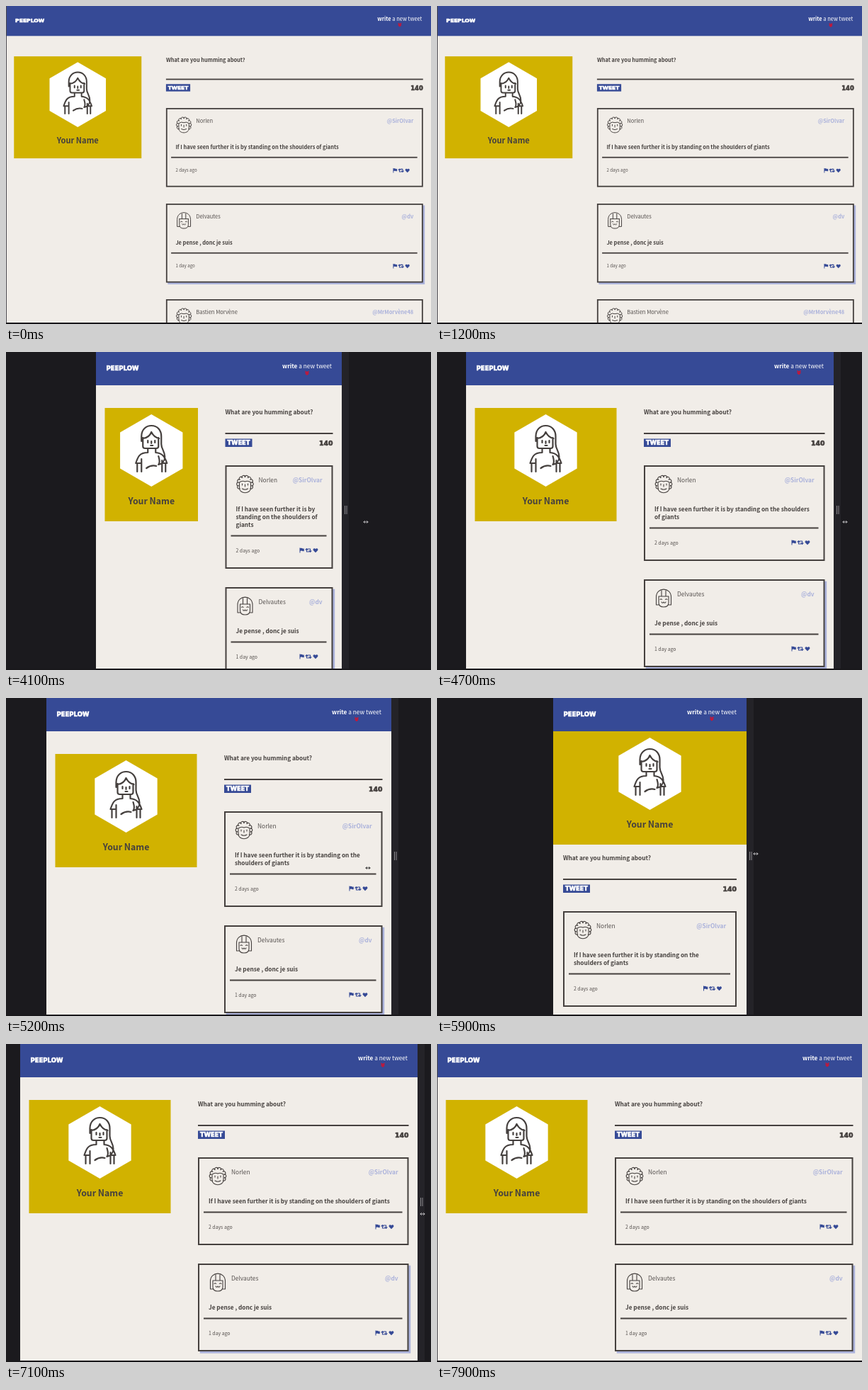
Write an HTML page with a canvas that moves like this. It is 600 by 449 pixels and loops after 8000 ms.

```html
<!DOCTYPE html>
<html lang="en">
<head>
<meta charset="utf-8">
<title>Responsive page</title>
<style>
html, body { margin: 0; width: 100%; height: 100%; overflow: hidden; background: #1b1a1e; }
canvas { display: block; width: 600px; height: 449px; }
</style>
</head>
<body>
<canvas id="stage" width="600" height="449"></canvas>
<script>
const ctx = document.getElementById('stage').getContext('2d');
const LOOP = 8000, STEP = 100, STAGE_W = 600, PAGE_H = 447;
const SANS = '"Noto Sans CJK JP", "Noto Sans CJK SC", "Noto Sans CJK", Lato, sans-serif';
const BLOCK = '"DejaVu Sans", sans-serif';
const C = {
  outer: '#1b1a1e', strip: '#242328', grip: '#8d8c90', paper: '#f1ede8', blue: '#364a96',
  gold: '#d1b200', ink: '#45403e', name: '#56514f', pale: '#abb2db', red: '#d8102c', white: '#fff'
};

// [time, left edge of the page]; the page stays centred
const EDGE = [[1900, 147], [2500, 147], [2700, 206], [3000, 206], [3400, 214], [3800, 206],
  [3900, 187], [4100, 127], [4700, 41], [4900, 22], [5200, 57], [5600, 103], [5900, 164],
  [6100, 182], [6500, 103], [7100, 20], [7400, 11], [7700, 0]];
const POINTER_X = [[3000, 400], [3800, 422], [4100, 508], [4700, 576], [4900, 580], [5200, 511],
  [5600, 484], [5900, 450], [6100, 436], [6500, 533], [7100, 588], [7400, 597]];
const POINTER_Y = [[5200, 240], [5900, 220], [6500, 232], [7100, 240]];

const TWEETS = [
  { name: 'Norlen', handle: '@SirOlvar', age: '2 days ago', face: 'curly',
    text: 'If I have seen further it is by standing on the shoulders of giants' },
  { name: 'Delvautes', handle: '@dv', age: '1 day ago', face: 'bob', raised: true,
    text: 'Je pense , donc je suis' },
  { name: 'Bastien Morvène', handle: '@MrMorvène48', age: '1 day ago', face: 'curly',
    text: 'Bonjour tout le monde' }
];

const WOMAN = new Path2D(`M-14,-13 V-20 C-14,-30 -7,-35 0,-35 C9,-35 14,-28 14,-20 V-9
  C14,-2 19,1 19,9 C19,15 15,19 10,20 C13,16 11,12 10,8 M-12,-18 V-6 Q-12,-3 -9,-3 H7
  Q10,-3 10,-6 V-18 M-12,-17 Q-3,-18 0,-26 Q4,-18 11,-17 M-5,-14 V-11 M5,-14 V-11
  M0,-13 V-10 M-1,-7 H2 M-5,-3 V3 M6,-3 V2 M-5,3 C-17,3 -19,9 -22,18 H-14 M-14,12 V30
  M-20,18 V30 M6,3 C16,4 19,9 22,18 H15 M15,14 V30 M20,18 V30 M-7,25 Q0,20 7,22`);
const CURLY = new Path2D(`M-8,-3 Q-4,-6 0,-4 Q4,-6 8,-3 M-8,-3 V5 C-8,14 8,14 8,5 V-3
  M-4,-1 V1 M4,-1 V1 M0,0 V3 M-4,6 Q0,8.5 4,6`);
const BOB = new Path2D(`M-7,9 H-10.5 V-2 C-10.5,-16.5 10.5,-16.5 10.5,-2 V9 H7 M-7,-3 H7
  M-3,-11 V-3 M3,-11 V-3 M-7,-3 V6 Q-7,12 0,12 Q7,12 7,6 V-3 M-5,1.5 Q-3.7,0 -2.4,1.5
  M2.4,1.5 Q3.7,0 5,1.5 M-3,5 Q-1.5,7.5 0,5 Q1.5,7.5 3,5`);
const FLAG = new Path2D('M-3,-3.5 H-2 V-3 Q0,-3.6 1,-2.7 T3.3,-2.8 V1 Q2,1.6 1,.9 T-2,.9 V3.6 H-3 Z');
const HEART = new Path2D('M0,3.3 L-3,.3 C-4.6,-2 -1.6,-4.2 0,-1.8 C1.6,-4.2 4.6,-2 3,.3 Z');
const REPOST = new Path2D('M-2.5,-2 V2 H.6 M-4,-.8 L-2.5,-2.4 L-1,-.8 M2.5,2 V-2 H-.6 M1,.8 L2.5,2.4 L4,.8');

const clamp = (v, lo, hi) => Math.min(hi, Math.max(lo, v));

function track(keys, t) {
  const next = keys.findIndex(k => k[0] > t);
  if (next < 0) return keys[keys.length - 1][1];
  if (next === 0) return keys[0][1];
  const [t0, a] = keys[next - 1], [t1, b] = keys[next];
  return a + (b - a) * (t - t0) / (t1 - t0);
}

function rect(x, y, w, h, color) {
  ctx.fillStyle = color;
  ctx.fillRect(x, y, w, h);
}

function setFont(size, weight, family = SANS) {
  ctx.font = `${weight} ${size}px ${family}`;
}

function text(str, x, y, { size = 8.3, weight = 400, color = C.ink, align = 'left' } = {}) {
  setFont(size, weight);
  ctx.textAlign = align;
  ctx.fillStyle = color;
  ctx.fillText(str, x, y);
  return ctx.measureText(str).width;
}

function blockText(str, x, y, size, color, align = 'left') {
  setFont(size, 700, BLOCK);
  ctx.textAlign = align;
  ctx.fillStyle = ctx.strokeStyle = color;
  ctx.lineWidth = 0.7;
  ctx.fillText(str, x, y);
  ctx.strokeText(str, x, y);
}

function at(x, y, draw) {
  ctx.save();
  ctx.translate(x, y);
  draw();
  ctx.restore();
}

function strokePath(path, width, color = C.ink) {
  ctx.lineWidth = width;
  ctx.strokeStyle = color;
  ctx.lineCap = ctx.lineJoin = 'round';
  ctx.stroke(path);
}

function wrap(str, width) {
  setFont(8.25, 600);
  const lines = [];
  let line = '';
  for (const word of str.split(' ')) {
    const longer = line ? line + ' ' + word : word;
    if (line && ctx.measureText(longer).width > width) {
      lines.push(line);
      line = word;
    } else line = longer;
  }
  return [...lines, line];
}

function drawFace(kind) {
  if (kind === 'bob') return strokePath(BOB, 1.1);
  const hair = new Path2D();
  for (let i = 0; i < 10; i++) {
    const a = Math.PI * (0.86 + i * 1.28 / 9);
    hair.arc(Math.cos(a) * 9.3, Math.sin(a) * 9.8 - 0.5, 2.5, a - 1.6, a + 1.6);
  }
  strokePath(hair, 1.1);
  strokePath(CURLY, 1.1);
}

function drawHeader(w, t) {
  rect(0, 0, w, 47, C.blue);
  blockText('PEEPLOW', 14.5, 26, 8.5, C.white);
  const right = w - 14;
  const rest = text(' a new tweet', right, 23, { color: C.white, align: 'right' });
  const bold = text('write', right - rest, 23, { weight: 600, color: C.white, align: 'right' });
  const bob = Math.sin(t / 1000 * Math.PI * 2) * 0.5;
  at(right - (rest + bold) / 2, 29.3 + bob, () =>
    strokePath(new Path2D('M-2,-2 L0,0 L2,-2 M-2,.5 L0,2.5 L2,.5'), 1.4, C.red));
}

function drawProfile(x, y, w) {
  rect(x, y, w, 160, C.gold);
  at(x + w / 2, y + 60, () => {
    ctx.beginPath();
    for (let i = 0; i < 6; i++) {
      const a = Math.PI * (i / 3 - 0.5);
      ctx.lineTo(51 * Math.cos(a), 51 * Math.sin(a));
    }
    ctx.fillStyle = C.white;
    ctx.fill();
    strokePath(WOMAN, 2.2);
  });
  text('Your Name', x + w / 2, y + 136, { size: 12.3, weight: 600, align: 'center' });
}

function drawTweet(tweet, x, y, w) {
  const lines = wrap(tweet.text, w - 29);
  const divider = y + 66.5 + lines.length * 11;
  const h = 113 + lines.length * 11, right = x + w;
  if (tweet.raised) rect(x + 2.7, y + 2.7, w, h, C.pale);
  rect(x, y, w, h, C.ink);
  rect(x + 2, y + 2, w - 4, h - 4, C.paper);
  at(x + 28, y + 27, () => drawFace(tweet.face));
  text(tweet.name, x + 47, y + 23.5, { size: 8.4, weight: 300, color: C.name });
  text(tweet.handle, right - 15, y + 23.5, { weight: 600, color: C.pale, align: 'right' });
  lines.forEach((line, i) => text(line, x + 15, y + 64.5 + i * 11, { size: 8.25, weight: 600 }));
  rect(x + 8, divider - 1, w - 17, 2, C.ink);
  text(tweet.age, x + 15, divider + 23, { size: 6.9, color: C.name });
  ctx.fillStyle = C.blue;
  at(right - 44, divider + 20.5, () => ctx.fill(FLAG));
  at(right - 34.5, divider + 20.5, () => strokePath(REPOST, 1.2, C.blue));
  at(right - 24.5, divider + 20.5, () => { ctx.fillStyle = C.blue; ctx.fill(HEART); });
  return y + h + 26;
}

function drawMain(x, y, w) {
  text('What are you humming about?', x, y + 88, { size: 8.25, weight: 600 });
  rect(x, y + 114, w, 2, C.ink);
  rect(x, y + 122.5, 38, 11.5, C.blue);
  blockText('TWEET', x + 19, y + 131.3, 8.3, C.white, 'center');
  blockText('140', x + w, y + 131.8, 9.3, C.ink, 'right');
  let top = y + 160;
  for (const tweet of TWEETS) top = drawTweet(tweet, x, top, w);
}

function drawPage(w, t) {
  rect(0, 0, w, 500, C.paper);
  if (w < 290) {
    drawProfile(0, 47, w);
    drawMain(14, 141, w - 28);
  } else {
    const gap = 38.5, room = w - 25 - gap;
    const side = clamp(room - 152, 102, 200), main = Math.max(152, room - 200);
    const x = (w - side - gap - main) / 2;
    drawProfile(x, 79, side);
    drawMain(x + side + gap, 0, main);
  }
  drawHeader(w, t);
}

function drawPointer(t, right) {
  if (t < 3000 || t > 7400) return;
  const x = track(POINTER_X, t);
  at(x, track(POINTER_Y, t), () => strokePath(
    new Path2D('M-3,0 H3 M-1.6,-1.4 L-3,0 L-1.6,1.4 M1.6,-1.4 L3,0 L1.6,1.4'),
    1, x < right ? '#222' : '#c4c3c6'));
}

function render(now) {
  const t = Math.floor(now % LOOP / STEP) * STEP;
  const left = t < 1900 ? 0 : track(EDGE, t);
  const right = Math.min(STAGE_W, 601 - left);
  const zoom = t < 1400 ? 0.9 : 1;
  const framed = left > 0;

  rect(0, 0, STAGE_W, 449, C.outer);
  ctx.save();
  ctx.beginPath();
  ctx.rect(left, 0, right - left, PAGE_H);
  ctx.clip();
  ctx.translate(left, 0);
  ctx.scale(zoom, zoom);
  drawPage((right - left) / zoom, t);
  ctx.restore();

  if (framed) {
    rect(right, 0, 10, PAGE_H, C.strip);
    rect(right + 4, 217, 1, 12, C.grip);
    rect(right + 6.5, 217, 1, 12, C.grip);
  } else {
    rect(0, 0, 1, PAGE_H, '#4b4a50');
  }
  drawPointer(t, right);
  rect(0, PAGE_H, STAGE_W, 2, '#19181b');
}

let start;
function frame(now) {
  start ??= now;
  render(Math.max(0, now - start));
  requestAnimationFrame(frame);
}
requestAnimationFrame(frame);
</script>
</body>
</html>
```
